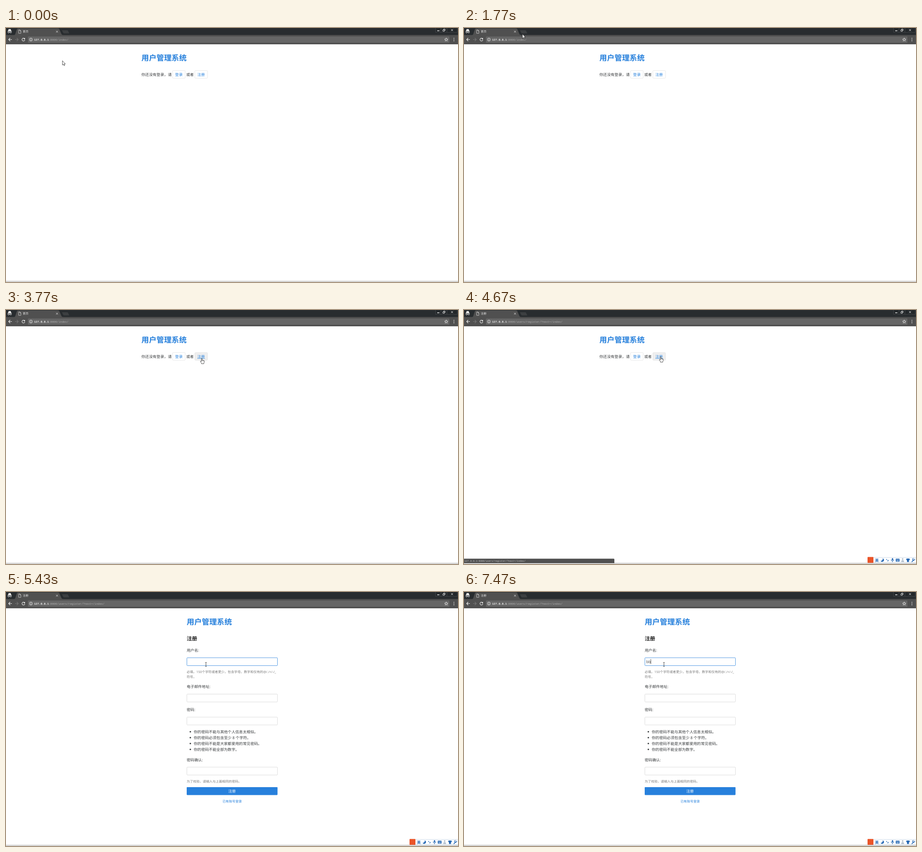
An HTML page for the animation above (8 s loop, 998 px wide and 561 px high).

```html
<!DOCTYPE html>
<html lang="zh-CN">
<head>
<meta charset="utf-8">
<title>用户管理系统</title>
<style>
  html, body { margin: 0; width: 100%; height: 100%; overflow: hidden; background: #fff; }
  svg { display: block; width: 998px; height: 561px; }
  text { font-family: "Open Sans", "Noto Sans CJK SC", "Noto Sans CJK", sans-serif; text-rendering: geometricPrecision; white-space: pre; }
  .mono { font-family: "Liberation Mono", monospace; }
</style>
</head>
<body>
<svg id="stage" viewBox="0 0 998 561" xmlns="http://www.w3.org/2000/svg"></svg>
<script>
const LOOP = 8000, BLUE = '#2780dc', INK = '#373a3c', GREY = '#777', TICK = 1000 / 15;

const text = (x, y, size, str, fill = INK, extra = '') =>
  `<text x="${x}" y="${y}" font-size="${size}" fill="${fill}" ${extra}>${str}</text>`;
const rect = (x, y, w, h, fill, extra = '') =>
  `<rect x="${x}" y="${y}" width="${w}" height="${h}" fill="${fill}" ${extra}/>`;
const line = (d, stroke, width = 1, extra = '') =>
  `<path d="${d}" fill="none" stroke="${stroke}" stroke-width="${width}" ${extra}/>`;
const shape = (d, fill, extra = '') => `<path d="${d}" fill="${fill}" ${extra}/>`;
const group = (id, body, extra = '') => `<g id="${id}" ${extra}>${body}</g>`;

const BOLD = 'font-weight="700"', MONO = 'class="mono"';

function chrome() {
  return rect(0, 0, 998, 16, '#282c2f') +
    rect(0, 15.5, 998, 20, '#505050') + rect(0, 35, 998, .8, '#3c3c3c') +
    shape('M18 16C20 15 20.500 13.500 21.500 10L24 3Q24.800 1 27 1H115Q117 1 118 3L122 12.500Q123 15.500 126 16Z', '#505050') +
    shape('M123.500 5H135Q136.500 5 137 6L139.800 12H128.500Q127 12 126.300 10.800Z', '#3c3f41') +
    // private-mode badge
    shape('M5.800 2.500H10.400L11.300 6H4.900ZM3.500 6.300H12.700V7.200H3.500Z', '#fff') +
    line('M7.300 9.400A1.600 1.600 0 1 1 4.100 9.400A1.600 1.600 0 1 1 7.300 9.400ZM12.100 9.400A1.600 1.600 0 1 1 8.900 9.400A1.600 1.600 0 1 1 12.100 9.400ZM7.300 9.200H8.900', '#fff', .9) +
    group('file', line('M27.900 4.400H31L32.900 6.300V11.800H27.900ZM30.800 4.400V6.500H32.900', '#ddd', .8)) +
    group('spin', line('M30.500 4.800A3.400 3.400 0 1 1 27.100 8.200', '#bbb', 1)) +
    text(37, 10.4, 6.25, '', '#eee', 'id="tab"') +
    line('M110.500 6L114.700 10.200M114.700 6L110.500 10.200', '#ddd', .9) +
    // window buttons
    rect(948.5, -1, 12, 10.5, '#23272a', 'stroke="#4a4d50" stroke-width=".7"') +
    rect(960.5, -1, 13, 10.5, '#23272a', 'stroke="#4a4d50" stroke-width=".7"') +
    rect(973.5, -1, 23, 10.5, '#23272a', 'stroke="#4a4d50" stroke-width=".7"') +
    rect(952, 5.5, 5, 1.4, '#eee') +
    line('M964.600 4.200H968V7.300H964.600ZM966 4V2.400H969.500V5.700H968.200', '#eee', .9) +
    line('M982.800 2.500L986.800 6.700M986.800 2.500L982.800 6.700', '#eee', 1) +
    // toolbar
    line('M13 25.500H6M9.200 22L5.800 25.500L9.200 29', '#eee', 1.1) +
    line('M20 25.500H27M23.800 22L27.200 25.500L23.800 29', '#757575', 1.1) +
    line('M41.300 24A3.200 3.200 0 1 0 41.600 26.500', '#eee', 1.1) + shape('M42 21.600V25H38.600Z', '#eee') +
    rect(48.5, 18.7, 930.5, 13.8, '#666', 'rx="1.200"') +
    '<circle cx="55" cy="25.500" r="3.300" fill="none" stroke="#eee" stroke-width=".9"/>' +
    rect(54.5, 25, 1, 2.5, '#eee') + rect(54.5, 23.4, 1, 1, '#eee') +
    text(62, 27.7, 6.03, '<tspan fill="#f4f4f4" stroke="#f4f4f4" stroke-width=".200">127.0.0.1</tspan><tspan id="path"></tspan>', '#b0b0b0', MONO) +
    line('M972 21.900L973 24.400L975.700 24.600L973.600 26.300L974.300 28.900L972 27.500L969.700 28.900L970.400 26.300L968.300 24.600L971 24.400Z', '#eee', .9) +
    [22.6, 25.5, 28.4].map(y => `<circle cx="989" cy="${y}" r=".850" fill="#eee"/>`).join('') +
    rect(0, 558, 998, 1, '#e6e6e6') + rect(0, 559, 998, 1, '#bcbcbc') + rect(0, 560, 998, 1, '#ececec');
}

const button = (id, x, label) =>
  rect(x, 94, 28, 17, '#fff', `id="${id}Box" rx="1.700" stroke="#ddd" stroke-width=".700"`) +
  text(x + 5.6, 105.7, 8.35, label, BLUE) +
  group(id + 'Line', rect(x + 5.4, 106.6, 17, .7, BLUE));

const field = (y, color) =>
  rect(399.4, y, 200, 17.4, '#fff', `rx="1.300" stroke="${color}" stroke-width=".800"`);

function home() {
  return text(299, 72.3, 16.65, '用户管理系统', BLUE, BOLD) +
    text(299, 105.7, 8.35, '你还没有登录，请') + text(398, 105.7, 8.35, '或者') +
    button('login', 367.7, '登录') + button('join', 416.9, '注册');
}

function form() {
  const rules = ['你的密码不能与其他个人信息太相似。', '你的密码必须包含至少 8 个字符。',
    '你的密码不能是大家都爱用的常见密码。', '你的密码不能全部为数字。'];
  return text(399, 72.3, 16.65, '用户管理系统', BLUE, BOLD) +
    text(399, 107.4, 11.6, '注册', '#222', BOLD) +
    text(399, 131.6, 8.35, '用户名:') + field(145.2, BLUE) +
    text(399, 179.2, 7.13, '必填。150个字符或者更少。包含字母，数字和仅有的@/./+/-/_', GREY) +
    text(399, 190.1, 7.13, '符号。', GREY) +
    text(399, 212.3, 8.35, '电子邮件地址:') + field(225.5, '#d4d4d4') +
    text(399, 263, 8.35, '密码:') + field(276.3, '#d4d4d4') +
    rules.map((r, i) => `<circle cx="407" cy="${308.7 + 13 * i}" r="1.600" fill="${INK}"/>` +
      text(414.5, 311.7 + 13 * i, 8.35, r)).join('') +
    text(399, 373.6, 8.35, '密码确认:') + field(386.8, '#d4d4d4') +
    text(399, 420.8, 7.13, '为了校验，请输入与上面相同的密码。', GREY) +
    rect(399, 431, 200.5, 17.4, BLUE, 'rx="1.300"') +
    text(499, 443, 8.35, '注册', '#fff', 'text-anchor="middle"') +
    text(478, 465.1, 7.13, '已有账号登录', BLUE) +
    text(402.2, 157, 8.35, '', '#444', 'id="typed"') +
    rect(402, 148.3, .8, 10.8, '#222', 'id="caret"') +
    group('tip', rect(442.4, 165.4, 44.4, 9.4, '#fdfdfe', 'rx=".800" stroke="#8a8a8a" stroke-width=".600"') +
      text(443.8, 172.4, 6.1, '请填写此字段。', '#575757'));
}

function inputBar() {
  const c = '#2568b4';
  return rect(898, 546.5, 101, 11.8, '#fff', 'stroke="#c3d4e6" stroke-width=".800"') +
    rect(891, 545.6, 13, 13, '#ea5428', 'rx="1"') +
    text(907.5, 555.6, 8.2, '英', c, BOLD) +
    shape('M924.500 548.500A4 4 0 1 1 919.800 554.200A4.600 4.600 0 0 0 924.500 548.500Z', c) +
    '<circle cx="933.200" cy="551" r="1" fill="' + c + '"/>' + shape('M935.500 552.200H937.300V553.500L936 555.600H935.200Z', c) +
    rect(944.6, 548, 3, 5, c, 'rx="1.500"') + line('M943 551.500A3 3 0 0 0 949 551.500M946 554.500V557', c, 1) +
    rect(953.3, 549.2, 8.4, 6.6, c, 'rx=".800"') +
    line('M954.500 551H960.700M954.500 552.500H960.700', '#fff', .7, 'stroke-dasharray="1 .700"') + rect(955.5, 553.7, 4, .8, '#fff') +
    '<circle cx="968.500" cy="550" r="1.800" fill="#aebccb"/>' + shape('M965.200 556.500Q965.500 552.500 968.500 552.500T972 556.500Z', '#aebccb') +
    shape('M978.500 548.600Q980.300 550 982.200 548.600L984.700 550.500L983.500 552.500L982.600 552V556.500H978V552L977.200 552.500L976 550.500Z', c) +
    line('M989 556L992.500 552.300', c, 1.8, 'stroke-linecap="round"') +
    line('M994.700 549.500A2.200 2.200 0 1 1 992.600 548.500', c, 1.4);
}

function pointers() {
  const outline = 'stroke="#111" stroke-width=".700" stroke-linejoin="round"';
  return group('arrow', shape('M.300 .300V9.900L2.500 7.900L3.900 11.300L5.400 10.700L4 7.400H6.800Z', '#fff', outline)) +
    group('hand', shape('M-.900 .300Q0-.600 .900 .300V4Q2 3.500 2.500 4.300Q3.500 3.900 4 4.800Q5.300 4.600 5.500 5.700V8.300L4.600 10V11.900H-.700V10.600L-3 7.300Q-3.300 5.700-1.900 6.100L-.900 7Z', '#fff', outline) +
      line('M.900 4V6M2.500 4.300V6M4 4.800V6.300', '#111', .5)) +
    group('beam', line('M-1.800-4.500H-.500L0-4L.500-4.500H1.800M0-4V4M-1.800 4.500H-.500L0 4L.500 4.500H1.800', '#222', .8));
}

document.getElementById('stage').innerHTML =
  rect(0, 0, 998, 561, '#fff') + group('home', home()) + group('form', form()) + chrome() +
  group('status', shape('M0 549.300H330.500Q332 549.300 332 550.800V559H0Z', '#505050') +
    text(1.2, 556.4, 5.23, '127.0.0.1:8000/users/register/?next=/index/', '#ccc', MONO)) +
  group('ime', inputBar()) + group('pointer', pointers());

const $ = Object.fromEntries([...document.querySelectorAll('[id]')].map(e => [e.id, e]));
const show = (el, on) => el.setAttribute('opacity', Number(on));
const put = (el, str) => { if (el.textContent !== str) el.textContent = str; };

// [start, end, waypoints]
const moves = [
  [330, 470, [[124.3, 72], [112, 63]]],
  [970, 1770, [[112, 63], [107, 48], [125, 23], [142, 15], [128.7, 13]]],
  [1830, 2600, [[128.7, 13], [115, 4], [94, 22], [150, 58], [264, 72]]],
  [2700, 2800, [[264, 72], [375.2, 129]]],
  [3000, 3770, [[375.2, 129], [373, 106], [386, 92], [418, 98], [432.3, 106.8]]],
  [3830, 4030, [[432.3, 106.8], [440.7, 107], [436, 104.5]]],
  [4230, 4270, [[436, 104.5], [435.2, 103.6]]],
  [4500, 4500, [[435.2, 103.6], [434.4, 103.3]]],
  [4770, 5430, [[434.4, 103.3], [438, 128], [441.5, 160]]]
];

function along(points, f) {
  const s = f * (points.length - 1), i = Math.min(Math.floor(s), points.length - 2), k = s - i;
  return [0, 1].map(a => points[i][a] + (points[i + 1][a] - points[i][a]) * k);
}

function pointerAt(t) {
  let pos = moves[0][2][0];
  for (const [start, end, points] of moves) {
    if (t < start - 2) break;
    const f = t >= end - 2 ? 1 : (Math.floor((t - start + 4) / TICK) + 1) / (Math.round((end - start) / TICK) + 1);
    pos = along(points, Math.min(1, f));
  }
  return pos;
}

const inside = ([x, y], l, t, r, b) => x >= l && x <= r && y >= t && y <= b;

function draw(t) {
  const pos = pointerAt(t), onForm = t >= 4768, loaded = t >= 4668;
  show($.home, !onForm);
  show($.form, onForm);

  let link = false;
  for (const [id, x] of [['login', 367.7], ['join', 416.9]]) {
    const over = !onForm && inside(pos, x, 94, x + 28, 111);
    const hit = over && inside(pos, x + 5, 97, x + 23, 109.5);
    $[id + 'Box'].setAttribute('fill', over ? '#efefef' : '#fff');
    show($[id + 'Line'], hit);
    link = link || hit;
  }
  const beam = onForm && inside(pos, 399, 145, 600, 163);
  show($.hand, link);
  show($.beam, beam);
  show($.arrow, !link && !beam);
  $.pointer.setAttribute('transform', `translate(${pos[0].toFixed(2)} ${pos[1].toFixed(2)})`);

  const loading = t >= 4498 && !loaded;
  show($.file, !loading);
  show($.spin, loading);
  put($.tab, loaded ? '注册' : '首页');
  put($.path, loaded ? ':8000/users/register/?next=/index/' : ':8000/index/');
  show($.status, t < 4228 || onForm ? 0 : t < 4268 ? .5 : 1);
  show($.ime, loaded);

  const count = t >= 7468 ? 2 : t >= 7198 ? 1 : 0;
  put($.typed, 'b'.repeat(count));
  $.caret.setAttribute('x', 402 + 5.1 * count);
  show($.caret, count || t < 5070 || (t >= 5668 && t < 6128) || t >= 6668);
  show($.tip, t < 5668 || count ? 0 : t < 5728 ? .5 : 1);
}

const begin = performance.now();
function frame() {
  draw((performance.now() - begin) % LOOP);
  requestAnimationFrame(frame);
}
frame();
</script>
</body>
</html>
```
